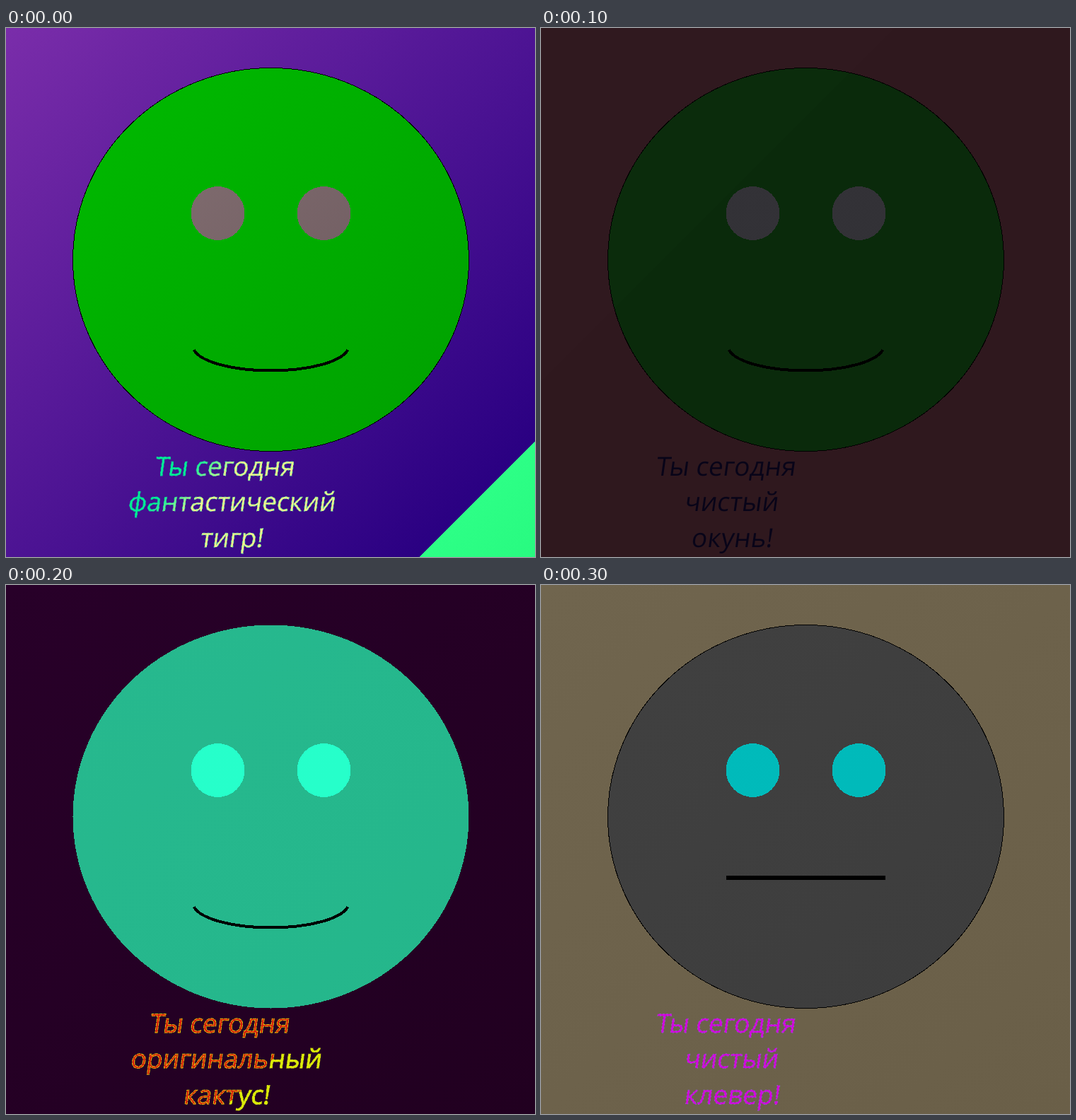
Recreate the animation shown at these times as an HTML page. Size 748x748 px, loop 0.4 s.

```html
<!DOCTYPE html>
<html lang="ru">
<head>
<meta charset="utf-8">
<title>Ты сегодня</title>
<style>
  html, body { margin: 0; width: 100%; height: 100%; overflow: hidden; }
  svg { display: block; width: 100vw; height: 100vh; }
  .shape { shape-rendering: crispEdges; }
  text { font: 500 37px "Open Sans", "Noto Sans", sans-serif; text-anchor: middle; }
</style>
</head>
<body>
<svg id="stage" viewBox="0 0 748 748"></svg>
<script>
const STEP = 100;
const SLANT = 8;
const MOUTHS = {
  smile: { d: 'M483.3 455.2A110.5 35.5 0 0 1 265.7 455.2', width: 4 },
  flat: { d: 'M262 414H487', width: 6 }
};

// Colour lists run along the diagonal; [colour, offset] pairs give hard edges.
const scenes = [
  {
    back: [['#7a2daa', 0], ['#2a0082', .891], ['#2dff86', .891], ['#28fa80', 1]],
    face: ['#00be00', '#009a00'], rim: '#000',
    eyes: ['#8c787a', '#5f4c52'], mouth: 'smile',
    ink: [['#00ee96', .59], ['#f4f58c', .63]],
    edge: [['#00d696', .59], ['#6cf5a0', .63]], dash: '3 3',
    lines: [[310, 'Ты сегодня'], [320, 'фантастический'], [320, 'тигр!']]
  },
  {
    back: [['#30191f', .334], ['#2f181e', .334]],
    face: [['#0b2c0c', .334], ['#0a2a0b', .334]], rim: '#000',
    eyes: ['#333237', '#323136'], mouth: 'smile',
    ink: ['#080418', '#080418'],
    lines: [[262, 'Ты сегодня'], [270, 'чистый'], [271, 'окунь!']]
  },
  {
    back: ['#280029', '#210020'],
    face: ['#27b98f', '#24b68a'], rim: 'none',
    eyes: ['#27ffcc', '#25ffc8'], mouth: 'smile',
    ink: [['#d8140c', .7], ['#dcec08', .7]],
    edge: [['#e6c80a', .7], ['#dcec08', .7]], dash: '5 1',
    lines: [[303, 'Ты сегодня'], [312, 'оригинальный'], [313, 'кактус!']]
  },
  {
    back: ['#70654e', '#6a5f48'],
    face: ['#414141', '#3c3c3c'], rim: '#000',
    eyes: ['#00bcbc', '#00b8b8'], mouth: 'flat',
    ink: ['#d800e0', '#d400dc'],
    edge: ['#9258d8', '#9258d8'], dash: '2 3',
    lines: [[262, 'Ты сегодня'], [270, 'чистый'], [271, 'клевер!']]
  }
];

const stage = document.getElementById('stage');

function add(parent, tag, attrs) {
  const node = document.createElementNS('http://www.w3.org/2000/svg', tag);
  for (const key in attrs) node.setAttribute(key, attrs[key]);
  return parent.appendChild(node);
}

function gradient(parent, id, colors, skew = 0) {
  const node = add(parent, 'linearGradient', {
    id, gradientUnits: 'userSpaceOnUse', x1: 0, y1: 0, x2: 748, y2: 748,
    gradientTransform: `skewX(${skew})`
  });
  colors.forEach((entry, i) => {
    const [color, offset] = Array.isArray(entry) ? entry : [entry, i];
    add(node, 'stop', { offset, 'stop-color': color });
  });
  return `url(#${id})`;
}

function drawScene(scene, index) {
  const group = add(stage, 'g', { opacity: 0 });
  const shapes = add(group, 'g', { class: 'shape' });
  const paint = (name, skew) => gradient(group, name + index, scene[name], skew);

  add(shapes, 'rect', { width: 748, height: 748, fill: paint('back') });
  add(shapes, 'ellipse', {
    cx: 374.5, cy: 327.5, rx: 280, ry: 271, fill: paint('face'), stroke: scene.rim
  });
  const eyeFill = paint('eyes');
  for (const cx of [299.5, 449.5]) {
    add(shapes, 'circle', { cx, cy: 262, r: 38, fill: eyeFill });
  }
  const mouth = MOUTHS[scene.mouth];
  add(shapes, 'path', {
    d: mouth.d, fill: 'none', stroke: '#000', 'stroke-width': mouth.width
  });

  const caption = add(group, 'g', {
    transform: `skewX(${-SLANT})`,
    fill: paint('ink', SLANT),
    stroke: scene.edge ? paint('edge', SLANT) : 'none',
    'stroke-dasharray': scene.dash || 'none'
  });
  const lean = Math.tan(SLANT * Math.PI / 180);
  scene.lines.forEach(([center, words], row) => {
    const y = 633 + row * 50.5;
    add(caption, 'text', { x: center + (y - 12) * lean, y }).textContent = words;
  });
  return group;
}

const loop = STEP * scenes.length;
const share = 1 / scenes.length;
scenes.map(drawScene).forEach((group, i) => {
  const show = group.animate([
    { opacity: 1, offset: 0 }, { opacity: 1, offset: share },
    { opacity: 0, offset: share }, { opacity: 0, offset: 1 }
  ], { duration: loop, delay: i * STEP - loop, iterations: Infinity });
  show.startTime = document.timeline.currentTime;
});
</script>
</body>
</html>
```
